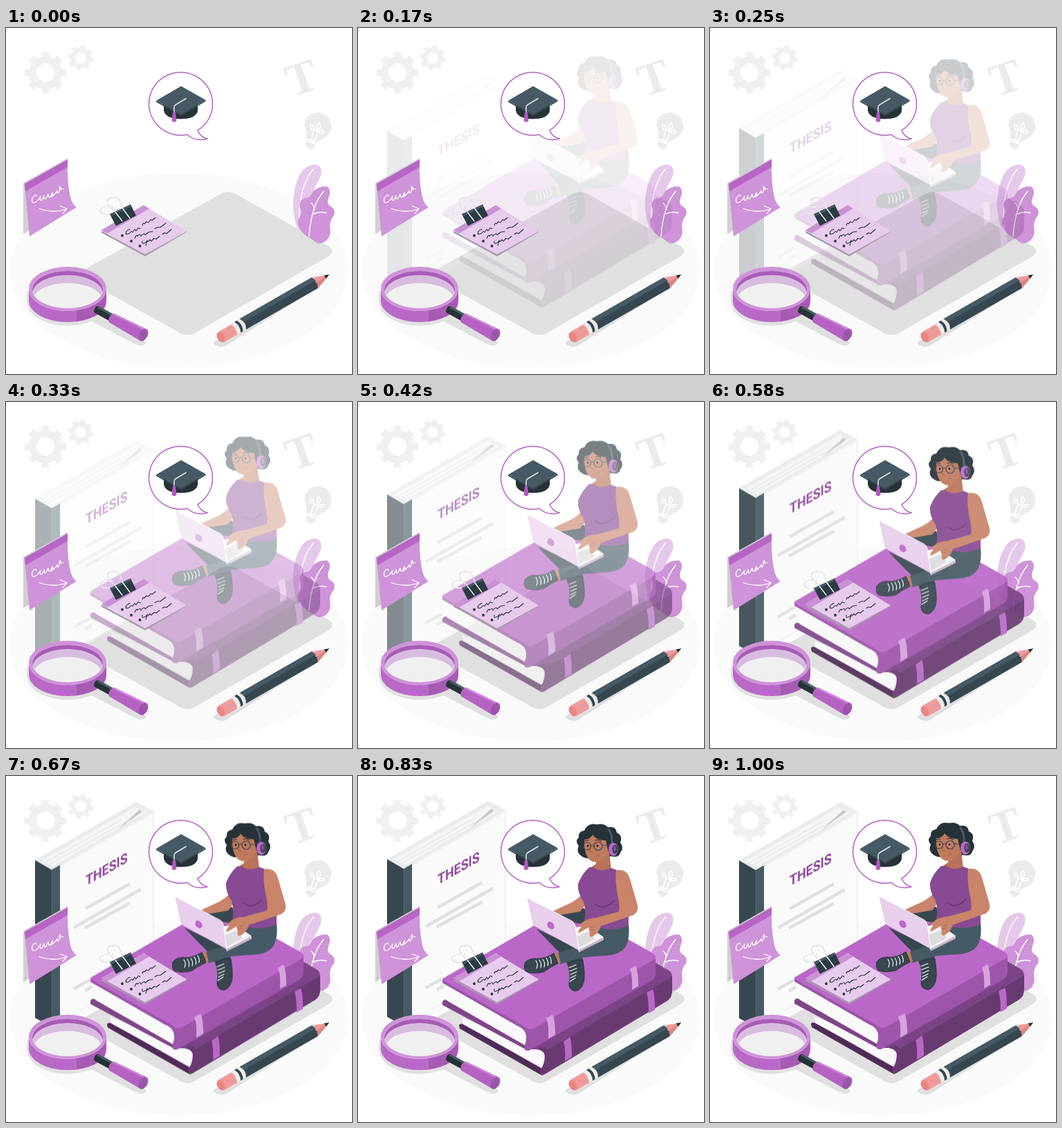
These frames come from a looping animation (500x500 px, 1.04 s). An HTML page:

```html
<!DOCTYPE html>
<html lang="en">
<head>
<meta charset="utf-8">
<title>Thesis</title>
<style>
  html, body { margin: 0; width: 100%; height: 100%; overflow: hidden; background: #fff; }
  svg { display: block; width: 100vw; height: 100vh; }
  .line { fill: none; stroke-linecap: round; stroke-linejoin: round; }
  .white { stroke: #fff; }
  .ink { stroke: #263238; }
  .slide { animation: settle 1040ms infinite; }
  .up { --from: 30px; }
  .down { --from: -30px; }
  @keyframes settle {
    0% { opacity: 0; transform: translateY(var(--from)); animation-timing-function: cubic-bezier(.36, -.01, .5, 1.38); }
    92.3%, 100% { opacity: 1; transform: none; }
  }
</style>
</head>
<body>
<svg viewBox="0 0 500 500">
  <defs>
    <g id="gear" fill="none" stroke="#f0f0f0">
      <circle r="18.5" stroke-width="11"/>
      <circle r="26" stroke-width="8" pathLength="80" stroke-dasharray="5 5" stroke-dashoffset="2.5"/>
    </g>
  </defs>

  <!-- backdrop -->
  <ellipse cx="250" cy="350" rx="244" ry="141" fill="#fafafa"/>
  <use href="#gear" transform="translate(57 64.500)"/>
  <use href="#gear" transform="translate(108 43.500) rotate(11) scale(.61)"/>
  <text transform="translate(434.500 93) rotate(-19)" text-anchor="middle" font-family="'Liberation Serif', serif" font-weight="700" font-size="67" fill="#ebebeb">T</text>
  <g fill="#ebebeb">
    <path d="M434 149C427 134 437 122 451 122C464 122 472 134 470 145C468 156 459 160 452 162L449 167L434 161Z"/>
    <path d="M434 164L448 169Q446 175 439 175Q432 172 434 164Z"/>
    <path class="line white" stroke-width="1.600" d="M436 160L449 165M441 161L445 147M446 163L451 150M445 147Q438 146 440 141Q444 138 445 147L451 150Q448 140 452 137Q457 139 451 150Q458 146 460 150Q458 154 451 150"/>
  </g>
  <path fill="#e0e0e0" d="M310 240Q321 234 332 240L466 315Q477 322 466 330L276 439Q263 448 250 440L112 363Q102 356 113 349Z"/>

  <!-- upright book -->
  <g class="slide up">
    <path fill="#ebebeb" d="M42 122L188 38L213 51L66 136Z"/>
    <path fill="#f5f5f5" d="M51 123L187 45L203 53L68 131Z"/>
    <path fill="#c7c7c7" d="M162 77L193 49L197 52Z"/>
    <path class="line" stroke="#e0e0e0" d="M56 126L166 64M61 129L178 64"/>
    <path fill="#fafafa" stroke="#e6e6e6" stroke-width=".8" d="M78 129L213 51V277L78 356Z"/>
    <path fill="#f0f0f0" d="M66 136L213 51V54L78 132Z"/>
    <path fill="#37474f" d="M42 122L66 136V363L42 350Z"/>
    <path fill="#455a64" d="M66 136L78 129V356L66 363Z"/>
    <path stroke="#5d717a" stroke-width=".7" d="M66.300 136V363"/>
    <text transform="matrix(.87 -.5 0 1 115 159.500)" font-family="Roboto, 'Liberation Sans', sans-serif" font-weight="700" font-size="20.500" fill="#9148a0">THESIS</text>
    <path stroke="#e0e0e0" stroke-width="4.500" d="M115 192L179 156M98 219.500L195 164M114 220L179 184M98 308L121 295M114 311L124 305"/>
  </g>

  <!-- leaves -->
  <path fill="#e5c9ea" d="M421 290Q412 262 416 240Q421 208 436 200Q450 194 455 203Q458 213 447 229Q439 246 435 295Z"/>
  <path class="line white" stroke-width="1.500" d="M444 204Q424 228 424 275"/>
  <path fill="#ce93d8" d="M432 299Q420 289 422 277Q429 268 425 260Q422 249 432 246Q440 246 443 237Q451 228 464 229Q471 234 466 246Q463 253 468 257Q477 261 474 271Q467 279 468 287Q471 301 462 308Q452 315 443 306Z"/>
  <path class="line white" stroke-width="1.500" d="M459 236Q441 257 438 301M444 269Q451 265 463 267M446 262Q444 255 441 253"/>

  <!-- books and reader -->
  <g class="slide down">
    <path fill="#4f2b57" d="M146 359Q146 355 153 357L266 421V431L147 363Z"/>
    <path fill="#fafafa" d="M151 348L246 384L268 390V420L152 357Z"/>
    <path fill="#7b4486" d="M244 393L430 268L449 279Q454 282 454 289L271 397Q268 390 258 393Z"/>
    <path fill="#693a72" d="M258 393Q270 386 274 394L454 288V309Q454 318 447 323L270 429Q267 431 264 430V422Q270 414 270 402Q269 395 258 393Z"/>
    <path fill="#ba68c8" d="M297 382Q303 378 306 375Q309 380 309 404L299 410Q300 390 297 382ZM417 311L426 306Q429 313 429 336L420 341Q420 320 417 311Z"/>

    <path fill="#7f4589" d="M122 326Q122 320 129 322L242 387L246 395L122 329Z"/>
    <path fill="#fafafa" d="M129 300L232 356Q246 362 245 374L241 387L129 323Z"/>
    <path fill="#9d55aa" d="M122 291L238 357Q247 361 254 358L430 258V284Q430 290 424 294L249 394Q246 396 241 394V387Q246 374 240 366Q237 362 230 359L122 297Z"/>
    <path fill="#ba68c8" d="M122 291L298 189Q304 186 310 189L424 253Q431 257 430 262L254 363Q247 366 239 359L122 293Z"/>
    <path fill="#d5a2de" d="M272 348L281 343Q285 350 285 372L275 378Q276 356 272 348ZM393 277L401 272Q405 280 405 302L396 307Q397 287 393 277Z"/>

    <!-- legs and shoes -->
    <path fill="#37474f" d="M278 194L327 189L337 215L304 208ZM258 219L285 247Q299 259 303 272L326 266L320 248Z"/>
    <path fill="#455a64" d="M391 211Q394 240 382 250Q372 258 352 258L326 260L292 270L288 254L326 242L346 218Z"/>
    <path fill="#c07a5e" d="M282 256L289 253L293 268L285 271Z"/>
    <g fill="#37474f" stroke="#263238" stroke-width=".8">
      <path d="M241 268Q248 260 260 262Q273 261 283 254Q287 262 289 269Q276 275 269 281Q254 285 243 281Q239 277 241 268Z"/>
      <path d="M303 270Q313 261 325 265Q328 280 327 292Q325 306 315 309Q304 308 305 297Q308 286 303 270Z"/>
    </g>
    <path class="line white" stroke-width="1.200" d="M257 265Q261 270 258 276M262 264Q266 269 264 275M267 263Q271 268 269 274M272 261Q276 267 274 272M277 259Q280 264 279 269M305 275L315 271M306 280L316 276M307 285L316 281M307 290L315 286M306 295L314 290"/>

    <!-- head and body -->
    <path fill="#263238" d="M322 113Q315 108 319 99Q313 92 319 87Q318 78 327 77Q332 65 345 68Q356 66 361 72Q373 70 374 80Q383 84 379 94Q385 102 379 109Q377 117 365 114Q356 122 337 116Q329 119 322 113Z"/>
    <path fill="#b87358" d="M345 108H363L366 133Q352 141 335 131L344 125Z"/>
    <path fill="#c07a5e" d="M327 90Q335 90 339 83Q345 91 358 91L362 108Q356 119 347 123Q335 124 330 112Q326 103 327 90Z"/>
    <path class="line" stroke="#9d5c45" stroke-width="1" d="M337 99L335 107L339 108M344 114Q346 111 349 113"/>
    <path class="line ink" stroke-width="1.200" d="M327 92L333 91M343 91Q348 89 351 92"/>
    <g fill="none" stroke="#37474f" stroke-width="1.200">
      <circle cx="331" cy="99.500" r="5.500"/><circle cx="347" cy="99.500" r="6"/>
      <path d="M336 99Q339 97 341 99M353 98L366 99"/>
    </g>
    <circle cx="332" cy="99" r="1.300"/><circle cx="346" cy="99" r="1.300"/>
    <path class="line" stroke="#455a64" stroke-width="3" d="M362 75Q368 82 367 97"/>
    <ellipse cx="369" cy="104" rx="7" ry="9.500" fill="#ba68c8"/>
    <ellipse cx="371.500" cy="104" rx="4.200" ry="6.500" fill="#37474f"/>
    <ellipse cx="371" cy="103" rx="2" ry="4" fill="#8b4b96"/>
    <path fill="#c9846a" d="M328 165Q315 179 302 184L280 194L291 199L321 194L331 181Z"/>
    <path fill="#874a93" d="M334 130Q323 140 318 154Q317 167 326 180Q330 194 327 207Q357 228 391 214L391 196Q377 166 374 134L366 131Q350 138 341 130Z"/>
    <path class="line" stroke="#66366f" stroke-width="1.500" d="M343 183Q356 193 370 178"/>

    <!-- laptop -->
    <path fill="#f5f5f5" d="M295 220L330 214L354 230Q356 233 354 235L320 251Z"/>
    <path fill="#dcdcdc" d="M316 230L334 222L342 234L320 246Z"/>
    <path fill="#c5b4c9" d="M318 250L355 231V235L319 253Z"/>
    <path fill="#e8cfec" d="M245 177Q244 174 248 175L309 208Q313 210 314 214L319 250L257 216Q253 214 252 209Z"/>
    <path class="line" stroke="#fafafa" stroke-width="1" d="M246 175L310 208Q313 211 314 215L319 250"/>
    <ellipse cx="278.500" cy="204" rx="4.500" ry="6" transform="translate(0 10) rotate(-38 278.500 204)" fill="#ba68c8"/>
    <path fill="#c9846a" d="M373 134Q389 132 393 147L404 185Q406 194 398 199L351 215Q348 225 339 230Q333 232 335 224L333 217L319 225Q317 222 323 216Q316 216 321 212Q331 203 344 203L377 194Q379 184 375 170Q371 148 373 134Z"/>
    <path class="line" stroke="#a6634c" stroke-width=".8" d="M337 217L343 215M335 221L341 220"/>
  </g>

  <!-- speech bubble -->
  <path fill="#fff" stroke="#b562c3" stroke-width="1.500" d="M262 154A46 45.500 0 1 1 277 148Q281 158 291.500 160Q274 165 262 154Z"/>
  <path fill="#263238" d="M228 109H277V120Q274 131.500 252 131.500Q230 131 228 119Z"/>
  <path fill="#37474f" d="M217 105L253 125L288.500 104V106L253 127L217 107Z"/>
  <path fill="#455a64" d="M217 105L253 84L288.500 104L253 125Z"/>
  <path class="line" stroke="#e6e6e6" stroke-width="1.500" d="M260 102L245 111Q243 112 243 115V122"/>
  <path fill="#b25bc0" d="M241 122Q243 119 245 122L246.500 134Q243 138 239.500 134Z"/>

  <!-- pinned sheet -->
  <path fill="#d0d0d0" d="M25 224L89 188L89 193L34 226L34 292L25 298Z"/>
  <path fill="#ce93d8" d="M27 226L89 190Q88 226 94 248Q97 256 102 259L34 301Q32 280 27 226Z"/>
  <path fill="#b765c5" d="M27 225L89 190V201L28 236Z"/>
  <path class="line white" stroke-width="1.300" d="M44 243Q42 239 38 246Q36 254 42 252Q47 249 50 243Q48 250 51 249Q54 247 55 242Q55 249 58 246L61 240Q61 246 64 244L67 238Q68 243 65 244Q72 240 74 235Q74 242 77 236Q80 230 78 229Q75 235 83 232M48 261Q67 268 87 262M78 257L88 261L82 268"/>

  <!-- notepad -->
  <path fill="#a89bac" d="M138 293L201 327L261 293V295L201 330L138 296Z"/>
  <path fill="#e6cbec" d="M138 292L199 256L261 294L201 327Z"/>
  <path fill="#ca90d4" d="M138 292L199 256L207 261L146 297Z"/>
  <g fill="#263238"><circle cx="168" cy="300" r="1.900"/><circle cx="181" cy="308" r="1.900"/><circle cx="193.500" cy="315" r="1.900"/></g>
  <path class="line ink" stroke-width="1.100" d="M179 291Q174 292 173 297Q176 300 181 294L183 295L186 291L188 293L191 289L194 290M197 285Q198 281 200 283L203 280L206 281L209 277L211 278L216 274M186 304Q189 297 190 301Q194 296 195 301Q200 295 201 299L206 295L212 294M215 290L219 288L223 288L231 282M197 308Q196 314 203 309Q206 303 202 314M205 309L208 306L210 308L214 304L217 305L222 301M226 298L229 296L232 297L239 291"/>
  <g class="line">
    <path stroke="#d2d2d2" stroke-width="1.800" d="M156 268Q137 271 136 264Q138 256 154 259M158 265Q145 255 147 248Q154 242 163 247L169 260"/>
    <path class="white" stroke-width=".9" d="M156 268Q137 271 136 264Q138 256 154 259M158 265Q145 255 147 248Q154 242 163 247L169 260"/>
  </g>
  <path fill="#2b3b43" d="M150 269L180 255L188 271L159 286Z"/>
  <path fill="#455a64" d="M150 269L180 255L181 258L152 272Z"/>
  <path class="line white" stroke-width="1.300" d="M158 266L168 279M168 260L179 275"/>

  <!-- magnifier -->
  <path fill="#e0e0e0" d="M31 380Q25 410 51 422Q84 438 124 424L187 457Q197 462 203 455L145 405Z"/>
  <ellipse cx="89" cy="387" rx="50" ry="28" fill="#f2f2f2"/>
  <ellipse cx="89" cy="386" rx="48" ry="20" fill="#f0f0f0"/>
  <path fill="#d8bce0" d="M38 378A51 27 0 0 1 140 378L137 387A49 23 0 0 0 41 387Z"/>
  <path fill="#a85bb5" d="M38 378A51 27 0 0 1 140 378V384A51 27 0 0 0 38 384Z"/>
  <path fill="#ba68c8" d="M33 377A56 32 0 0 0 145 377V394A56 31 0 0 1 33 394Z"/>
  <path fill="#a65ab3" d="M102 408Q145 399 145 377V394Q145 417 102 424Z"/>
  <path fill="#ce93d8" fill-rule="evenodd" d="M33 377A56 32 0 1 1 145 377A56 32 0 1 1 33 377ZM38 378A51 27 0 1 0 140 378A51 27 0 1 0 38 378Z"/>
  <g transform="translate(132 407) rotate(28.500)">
    <rect x="-4" y="-5" width="29" height="11" rx="4" fill="#263238"/>
    <path fill="#455a64" d="M0 -5H24V-2H-2Z"/>
    <path fill="#b562c3" d="M23 -6.500Q18 1 23 8L76 10V-9Z"/>
    <path fill="#c983d4" d="M23 -6.500L76 -9V-6L22 -4Z"/>
    <ellipse cx="76" cy=".5" rx="6" ry="9.500" fill="#9d55aa"/>
  </g>

  <!-- pencil -->
  <path fill="#e0e0e0" d="M299 455Q303 450 315 448L440 377L466 361L456 371L317 460Q306 463 299 455Z"/>
  <g transform="translate(312 445.500) rotate(-29.900)">
    <path fill="#ef9a9a" d="M22 -8H-1Q-7 -7 -7 1Q-6 9 0 9H22Z"/>
    <ellipse cx="-2" cy=".5" rx="5" ry="8" fill="#ea8585"/>
    <path fill="#ececec" d="M20 -9H39V9H20Q25 0 20 -9Z"/>
    <path fill="#37474f" d="M26 -9H30Q35 0 30 9H26Q31 0 26 -9Z"/>
    <path fill="#37474f" d="M35 -9H155L159 0L155 9H35Q41 0 35 -9Z"/>
    <path fill="#455a64" d="M35 -9H155L158 -2H38Z"/>
    <path fill="#ef9a9a" d="M155 -9L178 0L155 9Q160 4 156 0Q160 -5 155 -9Z"/>
    <path fill="#d98383" d="M157 1L178 0L155 9Q160 5 157 1Z"/>
    <path fill="#263238" d="M172 -3L179 0L172 3Z"/>
  </g>
</svg>
</body>
</html>
```
